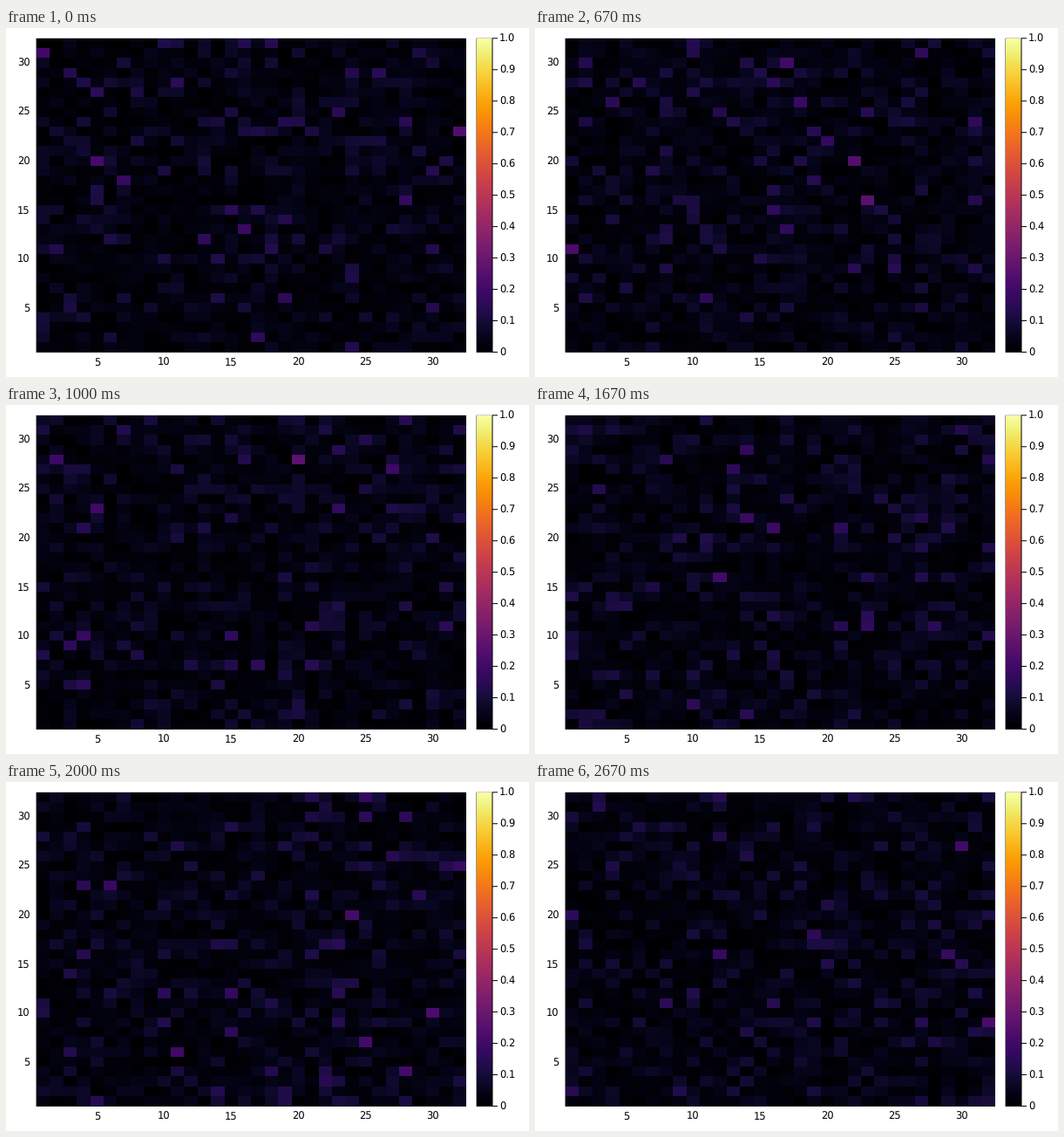
These frames come from a looping animation (600x400 px, 3010 ms). A matplotlib script:

```python
import matplotlib.pyplot as plt
import numpy as np
from matplotlib.animation import FuncAnimation

N = 32
STATES = 9
LOOP, STEP = 3010, 10
LEFT, RIGHT, TOP, BOTTOM = 35, 528, 11.8, 371.5
BAR_L, BAR_R = 540, 558

rng = np.random.default_rng(7)
grids = rng.gamma(1.2, 0.03, (STATES, N, N))

plt.rcParams.update({"font.family": "DejaVu Sans", "text.hinting": "none"})
fig = plt.figure(figsize=(6, 4), dpi=100, facecolor="white")
ax = fig.add_axes([0, 0, 1, 1])


def label(x, y, s, ha):
    ax.text(x, y, s, ha=ha, va="center_baseline", fontsize=8.3)


def line(xs, ys):
    ax.plot(xs, ys, color="black", lw=0.72, solid_capstyle="butt", snap=False)


def image(data, left, right):
    # A dark backing gives the image soft outer edges and its axis lines.
    ax.add_patch(plt.Rectangle((left - 0.4, TOP), right - left + 0.4,
                               BOTTOM - TOP + 0.4, color="black", lw=0,
                               snap=False))
    return ax.imshow(data, extent=(left, right, 371, 12), cmap="inferno",
                     vmin=0, vmax=1, origin="lower", zorder=2,
                     interpolation="nearest", aspect="auto")


heat = image(grids[0], LEFT, RIGHT)
for n in range(5, N, 5):
    f = (n - 0.5) / N
    label(LEFT + f * (RIGHT - LEFT), 382.3, str(n), "center")
    label(27.3, BOTTOM - f * (BOTTOM - TOP) - 0.5, str(n), "right")

image(np.linspace(0, 1, 256)[:, None], BAR_L, BAR_R)
line([BAR_R, BAR_R], [TOP, BOTTOM])
for n in range(11):
    y = BOTTOM - n / 10 * (BOTTOM - TOP)
    line([BAR_R, BAR_R + 6], [y, y])
    label(566, y - 0.5, f"{n / 10:.1f}" if n else "0", "left")

ax.set(xlim=(0, 600), ylim=(400, 0))
ax.axis("off")


def update(i):
    # Three states a second, switching on the nearest 10 ms.
    k = min((3 * i + 1) // 100, STATES - 1)
    heat.set_data(grids[k])
    return [heat]


anim = FuncAnimation(fig, update, frames=LOOP // STEP, interval=STEP,
                     repeat=True, repeat_delay=0)
plt.show()
```
